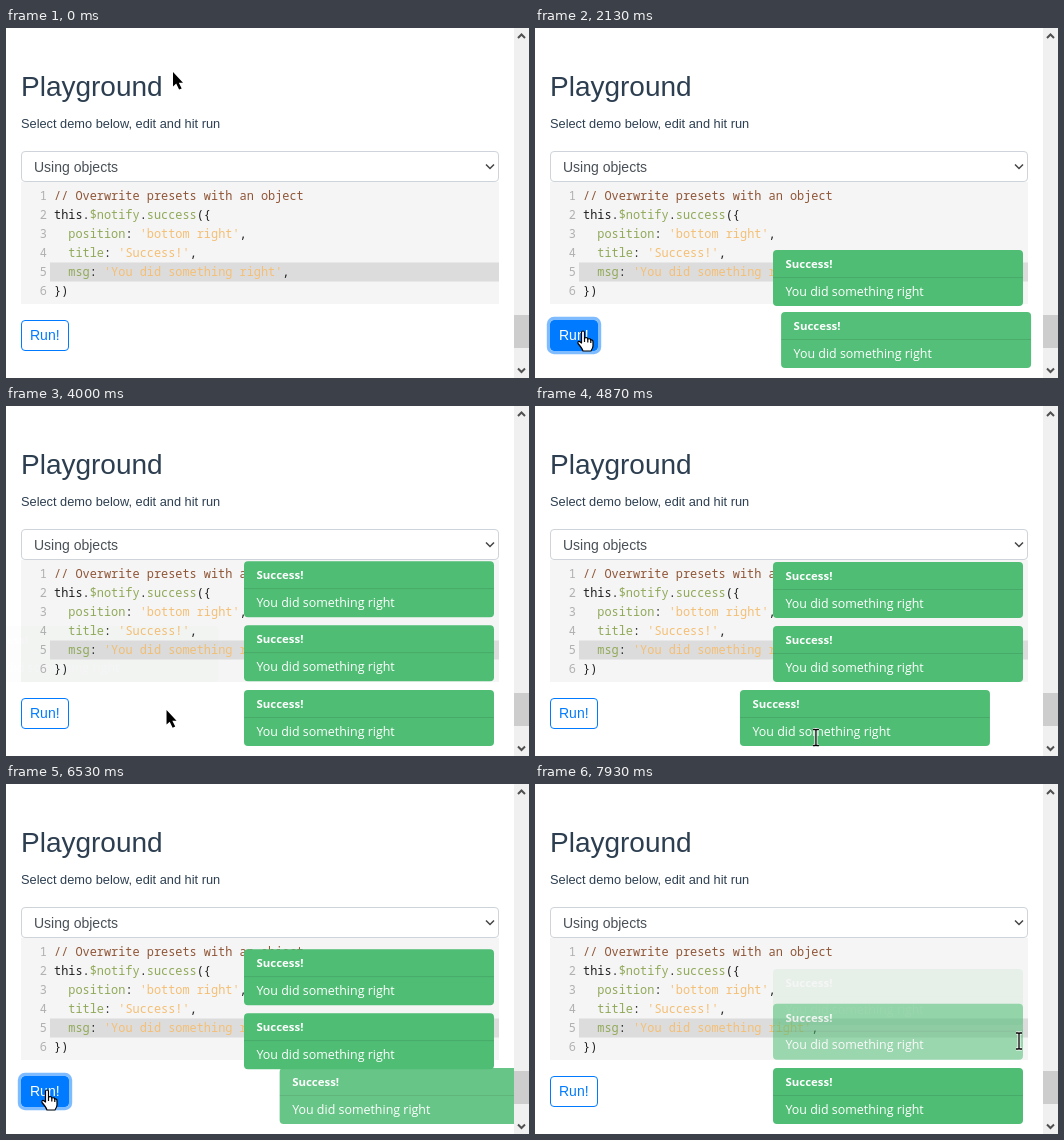
An HTML page for the animation above (8 s loop, 523 by 350 pixels).

```html
<!DOCTYPE html>
<html lang="en">
<head>
<meta charset="utf-8">
<title>Playground</title>
<style>
  html, body { margin: 0; width: 100%; height: 100%; overflow: hidden; background: #fff; }
  svg { display: block; width: 523px; height: 350px; }
  text { white-space: pre; }
  .page { font-family: "Liberation Sans", Arial, sans-serif; fill: #2c3e50; }
  .code { font: 11.9px "Noto Sans Mono", Consolas, monospace; fill: #202020; }
  .nums { fill: #b0b0b0; text-anchor: end; }
  .com { fill: #8f5536; }
  .prop { fill: #90a959; }
  .str { fill: #f4bf75; }
  .toast { font: 12.45px "Open Sans", "Segoe UI", sans-serif; fill: #fff; }
  .toast .title { font-size: 11.45px; font-weight: 700; }
</style>
</head>
<body>
<svg viewBox="0 0 523 350">
  <defs>
    <clipPath id="view"><path d="M0 0H508V350H0z"/></clipPath>
    <g id="toast" class="toast">
      <rect width="250" height="56" rx="4" fill="#4fbd74"/>
      <path d="M0 27.5H250" stroke="#000" stroke-opacity=".1"/>
      <text class="title" x="12.5" y="18">Success!</text>
      <text x="12.5" y="45.5">You did something right</text>
    </g>
  </defs>

  <g class="page">
    <text x="15" y="68" font-size="28">Playground</text>
    <text x="15" y="100" font-size="12.8">Select demo below, edit and hit run</text>
    <path d="M15 154H493V276H15z" fill="#f5f5f5"/>
    <rect x="15.5" y="123.5" width="477" height="30" rx="3.5" fill="#fff" stroke="#ced4da"/>
    <text x="28" y="144" font-size="14" fill="#495057">Using objects</text>
    <path d="M480 136.5l4 4 4-4" fill="none" stroke="#444" stroke-width="1.5"/>
  </g>

  <path d="M44 234.5H493V253.5H44z" fill="#dddcdc"/>
  <g class="code">
    <g id="nums" class="nums"></g>
    <text x="48" y="172" class="com">// Overwrite presets with an object</text>
    <text x="48" y="191">this.<tspan class="prop">$notify</tspan>.<tspan class="prop">success</tspan>({</text>
    <text x="62.3" y="210"><tspan class="prop">position</tspan>: <tspan class="str">'bottom right'</tspan>,</text>
    <text x="62.3" y="229"><tspan class="prop">title</tspan>: <tspan class="str">'Success!'</tspan>,</text>
    <text x="62.3" y="248"><tspan class="prop">msg</tspan>: <tspan class="str">'You did something right'</tspan>,</text>
    <text x="48" y="267">})</text>
  </g>

  <g class="page">
    <rect id="ring" x="13.4" y="290.4" width="51.2" height="34.2" rx="5.6" fill="none" stroke="#007bff" stroke-opacity=".5" stroke-width="3.2"/>
    <rect x="15.5" y="292.5" width="47" height="30" rx="3.5" fill="#fff" stroke="#007bff"/>
    <rect id="fill" x="15.5" y="292.5" width="47" height="30" rx="3.5" fill="#007bff"/>
    <text id="label" x="24" y="312" font-size="14">Run!</text>
  </g>

  <g id="toasts" clip-path="url(#view)"></g>

  <path d="M508 0H523V350H508z" fill="#f0f0f0"/>
  <path d="M508 287H523V320H508z" fill="#cdcdcd"/>
  <path d="M512 10l3.5-3.5L519 10M512 340.500l3.500 3.500 3.500-3.500" fill="none" stroke="#505050" stroke-width="2"/>

  <g id="cursor">
    <path id="arrow" d="M0 0v14.500l3.200-2.900 2.900 6 2.600-1.200-2.900-5.700h4.200z" stroke="#fff" stroke-width="1.200" paint-order="stroke"/>
    <g id="beam" fill="none">
      <path d="M-3-8H-.8L0-7.300.8-8H3M0-7.300V7.300M-3 8H-.8L0 7.300.8 8H3" stroke="#fff" stroke-width="3"/>
      <path d="M-3-8H-.8L0-7.300.8-8H3M0-7.300V7.300M-3 8H-.8L0 7.300.8 8H3" stroke="#000" stroke-width="1.300"/>
    </g>
    <g id="hand" stroke="#000" stroke-width="1.200" stroke-linejoin="round">
      <path d="M-1.500 12V1.500Q-1.500 0 0 0T1.500 1.500V7Q4.500 6 4.800 8 7.500 7.200 7.800 9 10 8.600 10 11V15Q10 17 8 20H0Q-1 17-5 12.500-5.500 10-3.500 10.500z" fill="#fff"/>
      <path d="M1.500 7v4M4.800 8v3.500M7.800 9v3" fill="none"/>
    </g>
  </g>
</svg>

<script>
const LOOP = 8000, MOVE = 500, BOTTOM = 284, STEP = 64, LEFT = 238, EXIT = 278;
const $ = id => document.getElementById(id);
const clamp = v => Math.min(1, Math.max(0, v));

// CSS "ease": cubic-bezier(.25, .1, .25, 1)
function ease(x) {
  if (x <= 0 || x >= 1) return clamp(x);
  let lo = 0, hi = 1, s;
  for (let i = 0; i < 24; i++) {
    s = (lo + hi) / 2;
    const u = 1 - s;
    if (.75 * u * u * s + .75 * u * s * s + s ** 3 < x) lo = s; else hi = s;
  }
  const u = 1 - s;
  return .3 * u * u * s + 3 * u * s * s + s ** 3;
}
const moved = (t, start) => ease((t - start) / MOVE);

// grab marks toasts that are swiped away, dir the swipe direction
const toasts = [
  { enter: 1555, leave: 7605 },
  { enter: 1745, leave: 7795 },
  { enter: 2135, leave: 3575, grab: 3380, dir: -1 },
  { enter: 2300, leave: 4970, grab: 4780, dir: -1 },
  { enter: 6250, leave: 7470, grab: 7360, dir: 1 },
  { enter: 6560, leave: Infinity }
];
const hovers = [[1100, 2490], [5800, 6690]];
const focuses = [[1555, 3380], [6250, 7360]];

// time, x, y
const path = [
  [0, 167, 44], [330, 167, 44], [700, 122, 160], [1130, 48, 303], [2450, 48, 303],
  [2930, 237, 250], [3200, 300, 250], [3380, 300, 250], [3575, 230, 262],
  [4000, 160, 304], [4200, 267, 316], [4470, 314, 332], [4780, 314, 332],
  [4970, 245, 331], [5330, 136, 327], [5600, 75, 328], [6000, 41, 306],
  [6640, 41, 306], [7060, 298, 246], [7130, 312, 257], [7360, 312, 257],
  [7470, 350, 258], [7930, 484, 257], [8000, 484, 257]
];

function pointer(t) {
  const i = path.findIndex(p => p[0] > t);
  const [t0, x0, y0] = path[i - 1], [t1, x1, y1] = path[i];
  const k = (t - t0) / (t1 - t0);
  return [x0 + (x1 - x0) * k, y0 + (y1 - y0) * k];
}

const during = (t, spans) => spans.some(([a, b]) => t >= a && t < b);
const fade = (t, spans) => spans.reduce((v, [a, b]) => v + ease((t - a) / 150) - ease((t - b) / 150), 0);

function make(tag, attrs, parent) {
  const el = document.createElementNS("http://www.w3.org/2000/svg", tag);
  for (const k in attrs) el.setAttribute(k, attrs[k]);
  return parent.appendChild(el);
}

for (let i = 0; i < 6; i++) {
  make("text", { x: 41, y: 172 + 19 * i }, $("nums")).textContent = i + 1;
}
for (const toast of toasts) toast.el = make("use", { href: "#toast" }, $("toasts"));

function drawToast(toast, i, t) {
  const gone = moved(t, toast.leave);
  let x = LEFT + 250 * (1 - moved(t, toast.enter));
  if (toast.grab && t > toast.grab) {
    const drag = pointer(Math.min(t, toast.leave))[0] - pointer(toast.grab)[0];
    x = LEFT + drag + (toast.dir * EXIT - drag) * gone;
  }
  const above = toasts.slice(i + 1).reduce((n, o) => n + moved(t, o.enter) - moved(t, o.leave), 0);
  toast.el.setAttribute("transform", `translate(${x} ${BOTTOM - STEP * above})`);
  toast.el.setAttribute("opacity", moved(t, toast.enter) * (1 - gone));
}

function drawCursor(t) {
  const [x, y] = pointer(t);
  const onCode = x > 44 && x < 493 && y > 156 && y < 276;
  const onToast = x > LEFT && y > 276;
  const kind = during(t, hovers) ? "hand" : onCode || onToast ? "beam" : "arrow";
  for (const id of ["arrow", "beam", "hand"]) $(id).style.display = id === kind ? "" : "none";
  $("cursor").setAttribute("transform", `translate(${x} ${y})`);
}

function draw(now) {
  const t = now % LOOP;
  const hover = fade(t, hovers);
  toasts.forEach((toast, i) => drawToast(toast, i, t));
  $("fill").setAttribute("opacity", hover);
  $("label").setAttribute("fill", `rgb(${255 * hover},${123 + 132 * hover},255)`);
  $("ring").setAttribute("opacity", fade(t, focuses));
  drawCursor(t);
}

const begin = performance.now();
function tick() {
  draw(performance.now() - begin);
  requestAnimationFrame(tick);
}
tick();
</script>
</body>
</html>
```
